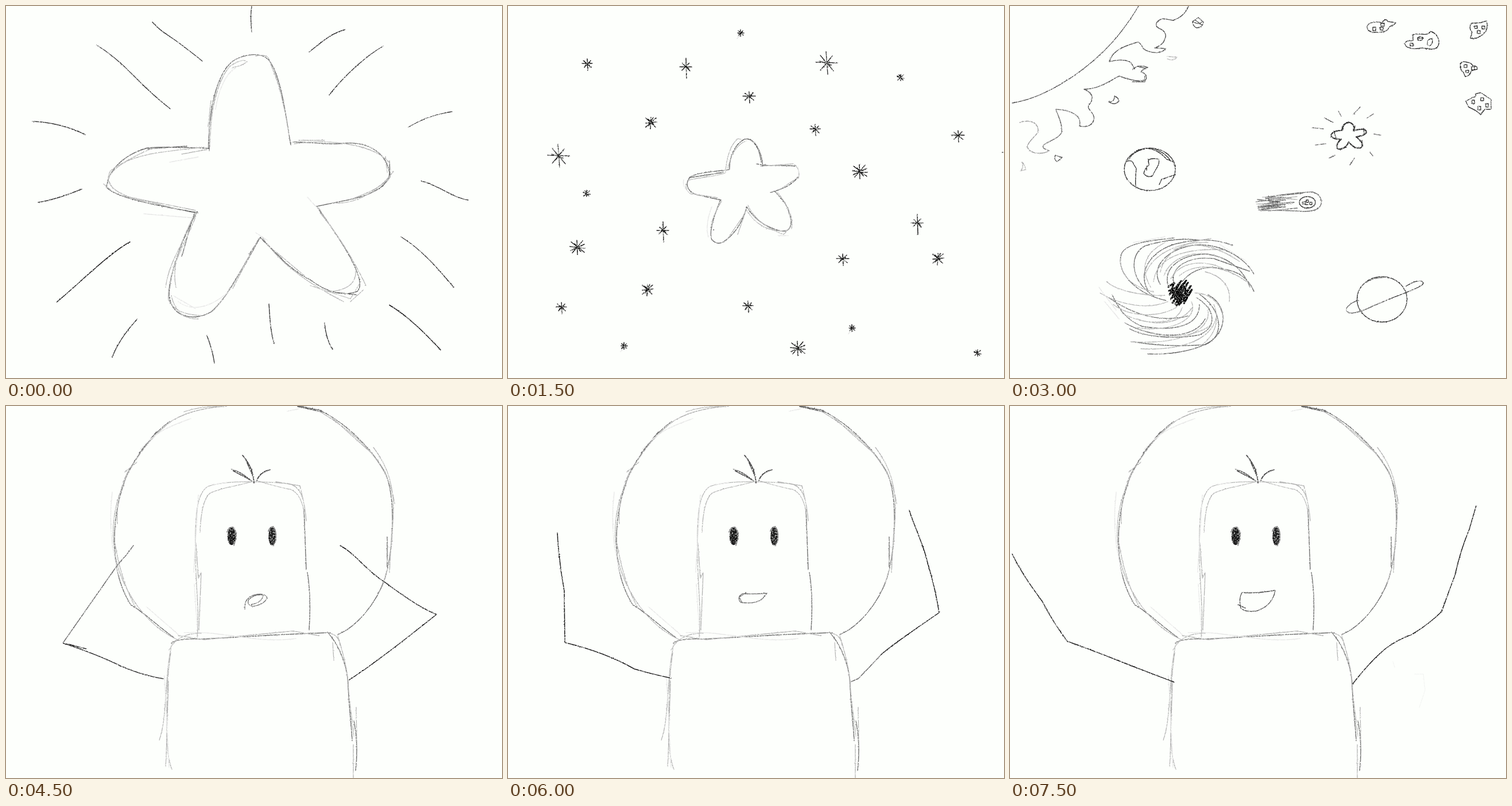
Animation of 864x648 px, one loop 8 s. Source, as an HTML page:

```html
<!DOCTYPE html>
<html lang="en">
<head>
<meta charset="utf-8">
<title>Pencil star</title>
<style>
  html, body { margin: 0; width: 100%; height: 100%; overflow: hidden; background: #fdfffc; }
  svg { display: block; width: 100vw; height: 100vh; }
  path, ellipse { fill: none; stroke-linecap: round; stroke-linejoin: round; }
  .scene { visibility: hidden; filter: url(#pencil); stroke: #2a2a2a; stroke-width: 1.4;
           animation: beat 8s step-end infinite; animation-delay: var(--at); }
  .figure { animation-name: stay; }
  .last { animation-name: end; }
  .faint { stroke: #e6e6e6; }
  .light { stroke: #b0b0b0; stroke-width: 1.3; }
  .mid { stroke: #666; }
  .dark { stroke: #111; stroke-width: 1.5; }
  .bold { stroke-width: 2.2; }
  .core { stroke: #000; stroke-width: 3; }
  .solid { fill: #181818; stroke: #181818; }
  @keyframes beat { 0% { visibility: visible } 18.75%, 100% { visibility: hidden } }
  @keyframes stay { 0% { visibility: visible } 43.75%, 100% { visibility: hidden } }
  @keyframes end { 0% { visibility: visible } 6.25%, 100% { visibility: hidden } }
</style>
</head>
<body>
<svg viewBox="0 0 864 648">
  <defs>
    <filter id="pencil" filterUnits="userSpaceOnUse" x="0" y="0" width="864" height="648" color-interpolation-filters="sRGB">
      <feTurbulence type="fractalNoise" baseFrequency=".4" numOctaves="2" seed="4" result="noise"/>
      <feDisplacementMap in="SourceGraphic" in2="noise" scale="2.2" xChannelSelector="R" yChannelSelector="G" result="rough"/>
      <feColorMatrix in="noise" values="0 0 0 0 0  0 0 0 0 0  0 0 0 0 0  0 0 2.6 0 -.36"/>
      <feComposite in="rough" operator="in"/>
    </filter>
    <!-- twinkles -->
    <path id="dot" d="M0-6V6M-5 0H6M-4-4L5 4M4-4L-4 5M-2-3L3 2M-2 2L3-2"/>
    <path id="speck" d="M0-5V6M-6-1L6 2M-5 5L5-4M-3-4L4 5M-6-2L2 3"/>
    <path id="burr" d="M0-9L1 11M-9-1H9M-7-6L7 6M6-6L-5 6M-3-3L4 2M-4 3L5-2"/>
    <path id="tall" d="M0-15L1 20M-11 0H10M-6-6L7 7M6-7L-7 6M-3-3L5 3"/>
    <path id="big" d="M-1-20L2 20M-19-1L19 0M-11-13L12 14M10-12L-11 13M-5-5L6 6M6-7L-5 7M-12-3L8 4"/>
    <path id="claw" d="M0-9L-1 11M-9-8L8 8M9-8L-9 8M-9 1L10-1M4-9L-4 6M-5-6L5 3"/>
    <path id="flat" d="M0-9L1 11M-11-1H11M-7-6L8 6M7-7L-7 6M-4 2L5-3"/>
    <path id="flare" d="M-1-12L0 13M-13-1L13 2M-11-9L12 9M9-11L-9 10M-12 6L12-5M-5-6L6 8"/>
  </defs>

  <g class="scene" style="--at:0s">
    <path d="M428 0Q425 20 428 45M255 28Q265 40 285 53T342 96M158 68Q190 88 222 121T286 179M47 201Q95 203 138 224M56 342Q85 338 132 319"/>
    <path d="M228 546Q197 580 185 612M350 574Q360 600 363 622M458 519C460 545 460 565 467 588M555 552Q557 580 569 598M688 402C725 425 750 455 780 490"/>
    <path d="M723 305C750 310 775 333 805 338M701 211Q735 190 777 184M563 155C590 120 630 85 657 70M528 80C550 63 565 48 591 41"/>
    <path class="dark" d="M88 516C120 490 180 430 216 411M668 521C700 540 730 570 757 599"/>
    <g class="mid">
      <path d="M354 252C351 190 365 120 395 96C410 86 440 78 457 93C480 122 487 190 496 242"/>
      <path d="M500 237C530 236 560 243 590 239C630 236 662 255 668 290C668 312 640 328 600 337L541 349"/>
      <path d="M354 248C310 246 270 245 247 247C210 257 178 283 175 316C192 333 250 346 334 360"/>
      <path d="M333 358C310 400 285 460 284 505C290 545 330 549 357 533C385 510 408 460 443 403"/>
      <path d="M443 403C475 437 500 463 530 477C560 500 590 506 612 497C628 482 600 430 541 349"/>
      <path d="M328 362C315 400 312 420 306 436M443 403L424 432M417 450L440 408M445 405L480 440M247 249L315 244M262 346L334 361M668 270L669 298L655 315M560 497L610 503"/>
    </g>
    <g class="light">
      <path d="M352 248C353 190 368 130 390 105Q412 90 420 97Q410 105 395 107M357 165L352 210M374 130C360 170 357 190 355 245M435 87Q458 82 460 98L478 146M467 110Q485 170 493 225"/>
      <path d="M502 240C560 231 640 240 668 273M510 234H555M675 288C650 322 610 345 575 343M668 300C650 318 625 328 600 337M661 262L664 290"/>
      <path d="M345 246C280 253 220 256 182 287C170 308 185 327 240 340M250 250C215 265 180 285 178 303L186 318M306 258L350 250M200 330L330 356M240 339L300 354M170 310L182 320"/>
      <path d="M331 365C315 410 280 460 283 512Q295 538 340 539M325 370C295 430 290 460 296 490M278 490C282 460 295 435 305 415M288 505Q298 547 335 545M360 532C390 500 405 470 432 420M395 492L440 405"/>
      <path d="M446 402C480 455 540 490 588 515M470 428L520 470M547 360C580 400 607 445 627 487M545 352C575 400 600 430 609 455C612 480 600 495 560 498M530 487L600 510L618 480M600 515L622 495"/>
    </g>
    <path class="faint" d="M525 333L545 355M285 272L335 263M240 362L325 369M300 515C320 530 350 530 385 500M292 505L330 527M365 180C370 145 385 115 400 108M435 395L455 408"/>
  </g>

  <g class="scene" style="--at:1.5s">
    <g class="dark">
      <use href="#dot" x="405" y="47"/><use href="#dot" x="202" y="592"/><use href="#dot" x="599" y="561"/>
      <use href="#speck" x="684" y="124"/><use href="#speck" x="818" y="604"/><use href="#speck" x="137" y="326"/>
      <use href="#burr" x="138" y="101"/><use href="#burr" x="535" y="215"/><use href="#burr" x="418" y="523"/><use href="#burr" x="93" y="525"/>
      <use href="#tall" x="310" y="106"/><use href="#tall" x="270" y="391"/><use href="#tall" x="713" y="378"/>
      <use href="#claw" x="249" y="203"/><use href="#claw" x="243" y="494"/><use href="#claw" x="749" y="440"/>
      <use href="#flat" x="420" y="158"/><use href="#flat" x="784" y="226"/><use href="#flat" x="583" y="441"/>
      <use href="#flare" x="613" y="288"/><use href="#flare" x="121" y="420"/><use href="#flare" x="505" y="596"/>
    </g>
    <use href="#big" x="555" y="99"/><use href="#big" x="88" y="261"/>
    <path class="faint" d="M399 57L402 53M196 602L199 598M593 571L596 567"/>
    <path class="dark" d="M861 255h1M358 390h.5"/>
    <g class="mid">
      <path d="M386 284C385 265 395 240 412 232C430 227 445 260 443 279M433 275C460 281 480 276 500 279"/>
      <path d="M385 285C360 288 330 290 317 298C306 312 315 325 330 329L371 338M370 338C357 370 350 395 355 407Q364 417 375 411C395 398 408 378 416 350"/>
      <path d="M416 350C430 375 455 387 475 392C492 395 497 380 490 362C487 345 475 335 465 323M505 298C495 312 480 318 457 325M422 232Q438 245 441 272M316 299L375 290"/>
    </g>
    <g class="light">
      <path d="M379 290C380 262 390 238 401 231L407 233M383 282C390 255 400 240 415 235M440 279L497 275Q510 283 506 300M470 322L503 300"/>
      <path d="M378 291C350 300 330 298 313 304Q305 318 318 327L365 334M335 300L385 284M372 340C357 365 352 380 353 400M380 409L411 364"/>
      <path d="M418 347C425 365 445 385 480 398L492 385M416 356C430 380 455 395 485 391M470 325C485 345 498 365 494 388M415 355L400 398"/>
    </g>
    <path class="faint" d="M306 303Q303 315 316 325M355 350C347 370 345 390 349 402M470 400L488 400M505 280L507 290"/>
  </g>

  <g class="scene" style="--at:3s">
    <path stroke="#505050" d="M224 0C205 32 185 58 160 82C120 120 60 160 4 169"/>
    <g stroke="#484848">
      <path d="M311 0C306 14 294 22 284 25C272 24 268 20 263 23C252 28 253 36 260 39C270 43 273 50 270 57Q267 68 252 73L271 74C265 83 245 84 232 74Q226 62 222 63C200 70 180 75 173 97C190 92 205 94 211 99L217 110"/>
      <path d="M214 110Q223 101 240 107Q232 109 228 115Q240 118 237 128Q225 135 190 122C175 130 155 145 129 145C147 152 145 163 138 172C131 180 149 185 146 198C143 210 130 212 121 209"/>
      <path class="mid" d="M121 209C126 190 105 181 80 180C82 188 92 205 90 220C85 232 60 238 58 243Q55 248 68 252"/>
      <path stroke="#999" d="M68 252C60 258 35 260 30 245C33 232 50 225 49 215C47 200 30 198 17 203"/>
      <path d="M213 132H235V122M222 105L237 109M318 27L328 20L337 28Q335 38 325 38Q318 35 318 27Q330 34 335 27M322 24L334 33M182 157Q190 160 189 166Q183 174 172 167Q182 168 182 157M79 260L91 264L82 271Q76 268 79 260"/>
      <path class="light" d="M274 88L291 89Q285 97 274 92M21 272Q27 278 27 285L19 287Q24 280 21 272"/>
    </g>
    <!-- asteroids -->
    <path d="M622 36C624 27 640 27 648 29Q655 20 658 27L672 29C668 36 662 33 660 38C655 48 640 45 632 46Q622 44 622 36M632 37h5v6h-5zM646 30h6v5h-6zM645 37h5v5h-5z"/>
    <path d="M688 65C690 58 700 62 702 60V50C715 45 725 55 733 44C748 50 750 65 744 72C735 80 720 70 712 74Q700 75 697 73Q688 72 688 65M697 65h5v5h-5zM710 55Q716 51 720 56Q717 62 710 59zM711 56h8M727 65Q727 57 735 57Q738 64 732 69Q726 69 727 65"/>
    <path d="M804 30L820 29L830 26Q833 35 829 44Q815 60 802 56L805 46Q798 38 804 30M809 35h5v4h-5zM822 35h5v5h-5zM814 43h5v5h-5z"/>
    <path d="M784 101Q788 95 796 98Q804 99 806 104Q815 104 814 110L803 113Q803 121 793 123L790 116Q784 112 784 101M791 102h5v5h-5zM804 106h5v5h-5zM794 112h5v4h-5z"/>
    <path d="M794 166L806 159Q813 159 811 153L820 151Q828 156 838 163V180H827L820 189L811 182L799 176ZM805 164h4v6h-4zM820 160h5v5h-5zM815 175h5v6h-5zM829 170h4v6h-4z"/>
    <!-- shining star -->
    <path class="bold" d="M578 217C580 205 585 202 592 203C600 206 600 213 598 217C608 215 618 212 621 219C620 225 610 227 603 228C612 235 618 243 611 247C602 250 595 243 590 237C585 248 575 252 570 248C568 240 573 235 577 232C565 233 556 228 561 222Q568 216 578 217"/>
    <path d="M580 216Q580 205 590 202M600 215L601 209M564 218L568 230M616 214L617 224M613 234V245M574 249L586 246"/>
    <path class="mid" d="M572 183L577 192M610 176L598 189M633 188L622 195M527 212L546 214M532 242L550 240M556 265L566 260M592 277L600 265M627 255L632 261M634 223L646 225"/>
    <path d="M548 195L563 203"/>
    <!-- planets -->
    <ellipse cx="243.500" cy="284.500" rx="44.500" ry="37"/>
    <path d="M203 271Q213 267 215 275L220 283Q218 300 219 317M207 268Q212 254 235 249M235 248Q255 247 273 267L286 272M250 248Q270 255 280 270M233 292Q235 282 242 277L241 268Q250 264 259 267Q261 275 255 283L248 296Q240 300 233 292M260 311L264 302Q275 298 288 294M238 279V286"/>
    <ellipse cx="648" cy="511" rx="43.500" ry="39.500"/>
    <path d="M690 488C710 475 722 477 719 485C708 494 680 502 660 511"/>
    <path class="mid" d="M660 511Q640 519 625 526Q608 534 596 535C583 534 584 527 590 522Q597 515 607 513M615 485Q630 473 650 473"/>
    <!-- comet -->
    <path class="mid" d="M445 333C470 330 490 325 525 324C540 326 544 338 542 345C538 358 520 359 500 357L433 355"/>
    <ellipse cx="518" cy="342" rx="14" ry="10"/>
    <path d="M510 341h5v4h-5zM516 338h4v4h-4zM522 342h4v4h-4zM515 346h4"/>
    <path class="mid" d="M431 337L470 341L440 345L495 342L432 349L480 350L438 354L475 346L450 332L490 334L445 335L480 338L452 341L475 344M428 341L465 336M432 352L468 347M450 357L500 352M470 330L510 326M445 348L480 346"/>
    <path class="light" d="M440 333L500 337M430 345L490 344M436 357L485 354M455 337L500 332"/>
    <!-- spiral -->
    <g class="mid">
      <path d="M272 513C215 500 182 460 195 430C205 412 250 408 286 404M250 505C205 475 210 430 235 418C280 404 310 405 330 408M240 495C220 460 250 420 300 412C340 403 370 410 388 417"/>
      <path d="M262 485C240 450 285 417 330 416C370 415 410 440 425 467M276 488C265 455 300 433 340 432C375 435 405 455 418 490M285 480C280 455 310 435 355 440L417 462"/>
      <path d="M300 480C320 455 350 452 370 458C400 462 415 475 425 497M310 540C270 550 225 545 172 508M330 520C330 565 270 565 230 558C205 548 190 530 178 503M340 545C320 585 245 578 200 552"/>
      <path d="M345 503C375 520 380 555 355 580C330 600 280 608 240 606M330 502C370 530 375 575 340 590C290 594 245 590 215 585M325 508C360 530 360 560 330 573C280 582 230 575 208 562"/>
    </g>
    <g class="light">
      <path d="M270 504C225 505 185 495 168 480M250 498C215 490 190 470 193 440M245 490C225 455 235 430 270 412M235 470C245 435 290 410 345 412M250 480C255 440 300 420 375 425"/>
      <path d="M268 470C280 435 330 420 372 440M280 475C300 440 350 440 390 468M295 470C330 440 385 460 412 480M340 463C370 470 385 490 382 515M285 425C330 405 370 425 400 445M262 463C270 425 310 410 350 405"/>
      <path d="M275 515C240 530 190 520 157 500M290 525C255 545 205 540 180 520M300 525C290 560 230 555 195 535M316 515C330 545 280 570 220 560M345 530C350 565 300 590 210 585M360 540C350 590 280 600 228 597"/>
      <path d="M355 520C365 545 360 570 335 590M322 500C350 500 368 520 372 545M230 565C270 582 330 575 350 555M222 545C260 560 300 550 318 525"/>
    </g>
    <path class="faint" d="M215 412L270 402M155 490L185 530M165 515L190 545M365 415L412 445"/>
    <path class="core" d="M276 489L286 482L278 503L298 479L280 511L307 478L283 517L310 482L288 519L315 488L294 521L317 494L303 518L306 488L282 500L300 492L291 512L310 496M277 496L290 490M286 507L301 484M290 522L302 506"/>
  </g>

  <g class="scene figure" style="--at:4.5s">
    <g class="mid">
      <path d="M292 403C260 380 235 355 218 347C180 290 180 190 214 113C235 75 260 45 285 27"/>
      <path d="M508 0L552 10C600 35 640 80 660 115C680 160 675 250 660 300C645 345 610 385 578 398"/>
      <path d="M508 1L553 11M505-1L550 8M232 82L262 45M664 228V280"/>
      <path d="M523 285L519 180M525 290C530 320 530 360 528 390M288 413Q300 404 340 406C420 402 500 396 565 395"/>
      <path d="M560 394C580 415 596 455 596 490C598 530 602 560 603 583M606 548C612 580 612 610 609 635"/>
    </g>
    <g class="light">
      <path d="M300 408C240 380 190 310 187 230C183 150 230 70 290 25C320 8 350 3 385 0M207 115L228 98M194 205C192 170 200 140 212 115M190 240C200 300 215 330 225 350M310 10Q340 0 375 1"/>
      <path d="M540 6C600 40 665 90 677 170M565 18L640 85M640 72C665 105 678 140 674 200C672 260 665 290 655 315M668 290L672 215"/>
      <path d="M333 403C338 350 328 300 330 230C330 180 335 150 352 140C380 130 430 130 490 135C515 138 520 165 523 200M338 220Q340 165 355 152C375 142 400 140 428 132M440 131Q480 143 495 145Q515 152 520 190M470 132L512 139L518 165"/>
      <path d="M331 240L335 300L340 290L336 390M284 425Q300 395 340 396M300 400L345 407L500 392L545 400M555 395Q580 395 582 417M569 412L571 443"/>
      <path d="M290 410C275 470 282 540 267 582M287 430C276 500 283 560 278 628M283 480C282 540 275 600 289 633M578 400C590 440 597 470 597 500L606 575M610 525L611 585M605 590V648"/>
    </g>
    <path class="faint" d="M185 150C178 210 185 260 200 305M235 75C260 45 285 35 322 22M245 350L300 398M335 155L327 290M328 310L333 385M310 395C370 390 440 415 505 405M358 137L385 133M490 9L510 5M276 470L284 630"/>
    <path stroke="#444" stroke-width="1.8" d="M412 86Q430 105 432 134M393 110Q410 115 428 131M396 113L424 128M437 130Q442 115 460 111M417 92L430 122"/>
    <ellipse class="solid" cx="393" cy="227" rx="6.500" ry="14.500"/>
    <ellipse class="solid" cx="463.500" cy="227" rx="5.500" ry="15"/>
    <path class="mid" d="M385 220Q387 210 395 211Q402 215 401 230L397 243M457 218Q459 210 466 210Q472 218 470 235L465 244"/>
  </g>

  <g class="scene" style="--at:4.5s">
    <path class="mid" d="M222 243L210 259Q195 275 185 290Q150 340 99 413"/>
    <path d="M99 413L140 423M99 413Q160 433 200 453Q240 470 274 475M110 415L135 422"/>
    <path class="dark" d="M582 243C610 258 625 285 660 307Q720 352 750 363C710 395 640 450 598 477"/>
    <path class="mid" d="M416 354Q415 335 430 330Q450 324 455 334Q450 346 430 349Q418 346 423 337Q432 328 448 329Q447 342 427 346"/>
  </g>

  <g class="scene" style="--at:6s">
    <path class="dark" d="M86 221C88 260 92 290 98 322L99 412C140 422 180 435 220 458Q250 467 284 474"/>
    <path class="dark" d="M699 182C710 215 725 245 730 270Q745 320 751 360C715 385 670 415 650 433"/>
    <path class="mid" d="M650 433Q625 460 610 475L598 480M451 326Q430 328 409 327Q398 332 405 342Q430 346 443 336L451 326M415 325L403 333L408 343"/>
  </g>

  <g class="scene last" style="--at:7.5s">
    <path class="dark" d="M4 258Q20 292 56 340Q75 377 100 410C150 427 200 449 286 481"/>
    <path class="dark" d="M812 174L800 215Q785 250 775 295Q760 335 752 358Q730 380 700 398Q675 407 655 422Q630 442 597 484"/>
    <path stroke="#444" d="M462 321Q430 327 404 325Q398 335 402 352Q410 360 430 357Q458 347 462 321M397 346L410 352"/>
    <path class="faint" opacity=".4" d="M705 467H720L723 495L713 525M667 445L670 455"/>
  </g>
</svg>
</body>
</html>
```
